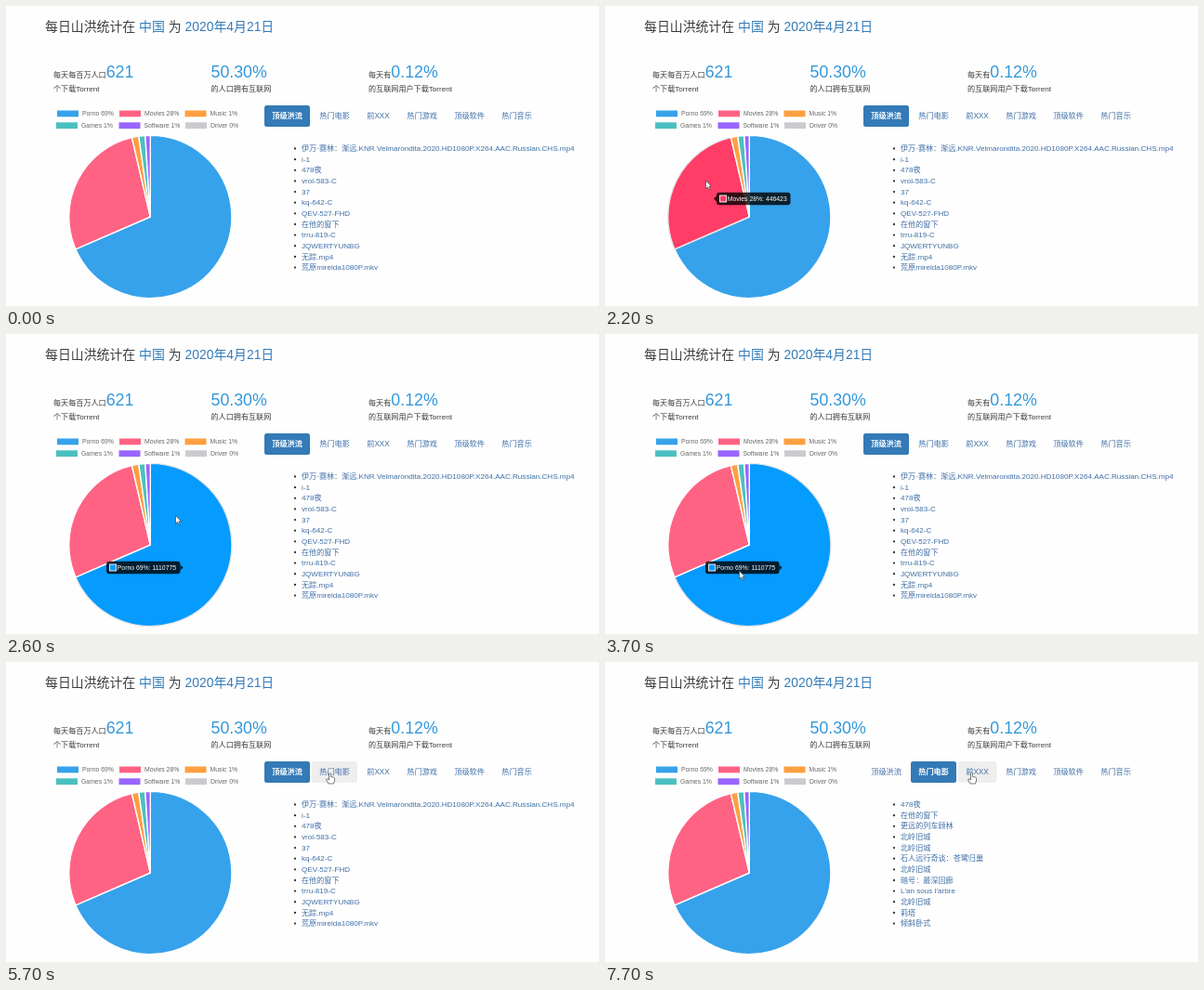
An HTML page that plays this animation: 638 by 323 pixels, repeating every 8 s.

```html
<!DOCTYPE html>
<html lang="zh">
<head>
<meta charset="utf-8">
<style>
html, body { margin: 0; height: 100%; overflow: hidden; background: #fefefe; }
svg { display: block; width: 100vw; height: 100vh; }
text { font-family: "Liberation Sans", "Noto Sans CJK SC", "Noto Sans CJK", sans-serif; white-space: pre; }
</style>
</head>
<body>
<svg id="stage" viewBox="0 0 638 323"></svg>
<script>
const LOOP = 8000, STEP = 100;
const LINK = '#416fa6', INK = '#3c3c3c', BIG = '#3498db';
const CX = 155.3, CY = 227, R = 87.6;

// start and end angle in degrees, clockwise from the top
const slices = [
  { from: 0, to: 246.6, rgb: [54, 162, 235], hover: [5, 155, 255] },
  { from: 246.6, to: 346.9, rgb: [255, 99, 132], hover: [255, 61, 103] },
  { from: 346.9, to: 351.8, rgb: [255, 159, 64] },
  { from: 351.8, to: 356.4, rgb: [75, 192, 192] },
  { from: 356.4, to: 360, rgb: [153, 102, 255] }
];
const legend = [
  ['Porno 69%', 55, 112.5], ['Movies 28%', 122, 112.5], ['Music 1%', 192.5, 112.5],
  ['Games 1%', 54, 125.3], ['Software 1%', 121.5, 125.3], ['Driver 0%', 193, 125.3]
];
const tabs = [
  ['顶级洪流', 278, 49], ['热门电影', 329, 49], ['前XXX', 380, 41.5],
  ['热门游戏', 423, 49], ['顶级软件', 474, 49], ['热门音乐', 525, 49]
];
const lists = [
  ['伊万·赛林：渐远.KNR.Velmarondita.2020.HD1080P.X264.AAC.Russian.CHS.mp4', 'i-1', '478夜',
    'vrol-583-C', '37', 'kq-642-C', 'QEV-527-FHD', '在他的窗下', 'trru-819-C', 'JQWERTYUNBG',
    '无踪.mp4', '荒原mirelda1080P.mkv'],
  ['478夜', '在他的窗下', '更远的列车顾林', '北岭旧城', '北岭旧城', '石人远行奇谈：苍鹭归巢',
    '北岭旧城', '暗号：最深回廊', "L'an sous l'arbre", '北岭旧城', '莉塔', '倾斜卧式']
];
// pointer path: time, x, y
const path = [
  [900, 488, 177], [1100, 374, 195], [1400, 264, 119], [1700, 134, 141],
  [1800, 127, 153], [2000, 112, 178], [2200, 108.5, 188], [2300, 158, 193],
  [2600, 182.5, 195.5], [3000, 150, 240], [3300, 131, 265], [3600, 131, 265],
  [3800, 158, 245], [4000, 215, 185], [4200, 263.5, 137], [4300, 282, 124],
  [4500, 304, 115], [4800, 307, 116], [5300, 307, 116], [5400, 307, 117],
  [5500, 307, 117], [5700, 348.5, 119.5], [7100, 348.5, 119.5],
  [7400, 372, 116], [7700, 394.5, 119.5], [8000, 394.5, 119.5]
];

const ease = d => 1 - (1 - Math.min(1, Math.max(0, d / 400))) ** 4;
const mix = (a, b, k) => a + (b - a) * k;
const rgb = c => `rgb(${c.map(Math.round)})`;
const text = (x, y, size, fill, str, extra = '') =>
  `<text x="${x}" y="${y}" font-size="${size}" fill="${fill}" ${extra}>${str}</text>`;
const rect = (x, y, w, h, fill, extra = '') =>
  `<rect x="${x}" y="${y}" width="${w}" height="${h}" fill="${fill}" ${extra}/>`;
const span = (fill, str, size) =>
  `<tspan fill="${fill}"${size ? ` font-size="${size}"` : ''}>${str}</tspan>`;

function header() {
  return text(42, 27.3, 13.9, INK,
      `每日山洪统计在 ${span('#337ab7', '中国')} 为 ${span('#337ab7', '2020年4月21日')}`) +
    text(51, 77, 8.1, INK, '每天每百万人口' + span(BIG, '621', 17.8)) +
    text(51, 92, 8.1, INK, '个下载Torrent') +
    text(220.5, 77, 17.8, BIG, '50.30%') +
    text(220.5, 92, 8.1, INK, '的人口拥有互联网') +
    text(390, 77, 8.1, INK, '每天有' + span(BIG, '0.12%', 17.8)) +
    text(390, 92, 8.1, INK, '的互联网用户下载Torrent') +
    legend.map(([label, x, y], i) =>
      rect(x, y, 23, 6.8, rgb(slices[i] ? slices[i].rgb : [201, 203, 207])) +
      text(x + 27, y + 5.8, 6.85, '#666', label)).join('');
}

function pie(levels) {
  const rim = deg => {
    const a = deg * Math.PI / 180;
    return `${CX + R * Math.sin(a)} ${CY - R * Math.cos(a)}`;
  };
  return slices.map((s, i) => {
    const k = levels[i] || 0;
    const fill = k ? s.rgb.map((v, j) => mix(v, s.hover[j], k)) : s.rgb;
    const edge = mix(255, 230, k);
    return `<path d="M${CX} ${CY}L${rim(s.from)}A${R} ${R} 0 ${+(s.to - s.from > 180)} 1 ${rim(s.to)}Z"
      fill="${rgb(fill)}" stroke="${rgb([edge, edge, edge])}" stroke-width="1.4"/>`;
  }).join('');
}

function tooltip(t) {
  const alpha = ease(t - 1700) - ease(t - 4100);
  if (alpha <= 0) return '';
  const k = ease(t - 2200), first = t <= 2200;
  const caret = first ? 'M0 3.6L-3 6.7L0 9.8Z' : 'M79.5 3.6L82.5 6.7L79.5 9.8Z';
  return `<g transform="translate(${mix(120, 108, k)} ${mix(200.8, 244.8, k)})" opacity="${alpha}">
    <g opacity=".8">${rect(0, 0, 79.5, 13.4, '#000', 'rx="3"')}<path d="${caret}"/></g>` +
    rect(3.6, 3.2, 7, 7, rgb(slices[first ? 1 : 0].hover), 'stroke="#fff" stroke-width=".9"') +
    text(11.8, 9.1, 6.85, '#fff', first ? 'Movies 28%: 446423' : 'Porno 69%: 1110775') + '</g>';
}

function pointer(t) {
  if (t < path[0][0]) return null;
  const i = path.findIndex(p => p[0] > t);
  const a = path[i - 1], b = path[i], k = (t - a[0]) / (b[0] - a[0]);
  return { x: mix(a[1], b[1], k), y: mix(a[2], b[2], k) };
}

const overTab = (p, [, x, w]) => p && p.x >= x && p.x <= x + w && p.y > 107 && p.y < 130;

function tabBar(active, p) {
  return tabs.map((tab, i) => {
    const [label, x, w] = tab, on = i === active;
    const back = on ? '#337ab7' : overTab(p, tab) ? '#eee' : '';
    return (back && rect(x, 107, w, 23, back, 'rx="2.5"')) +
      text(x + 8.2, 121.3, 8.2, on ? '#fff' : LINK, label, on ? 'font-weight="700"' : '');
  }).join('');
}

function list(items) {
  return items.map((item, i) => {
    const y = 153.2 + i * 11.64;
    return `<circle cx="311" cy="${y + .3}" r="1.15" fill="#333"/>` +
      text(318, y + 2.9, 8.1, LINK, item);
  }).join('');
}

function cursor(p) {
  if (!p) return '';
  const hand = tabs.some(tab => overTab(p, tab));
  const d = hand
    ? 'M-1 .6Q0-.5 1 .6V4L4 4.6Q5 5 5 6V8.5L4 11.5H-1.5L-3.8 7.6Q-4 6-2.5 6.4L-1 7.5Z'
    : 'M0 0V8.6L2 6.8L3.3 9.8L4.7 9.2L3.4 6.3H6Z';
  return `<path d="${d}" transform="translate(${p.x} ${p.y})" fill="#fff" stroke="#444" stroke-width=".7"/>`;
}

const stage = document.getElementById('stage');
const head = header();

function draw(t) {
  const p = pointer(t), active = t < 6300 ? 0 : 1;
  const leave = ease(t - 2200);
  stage.innerHTML = head +
    pie([leave - ease(t - 4100), ease(t - 1700) - leave]) +
    tooltip(t) + tabBar(active, p) + list(lists[active]) + cursor(p);
}

let last = -1;
function tick() {
  const t = Math.floor(performance.now() % LOOP / STEP) * STEP;
  if (t !== last) draw(last = t);
  requestAnimationFrame(tick);
}
tick();
</script>
</body>
</html>
```
